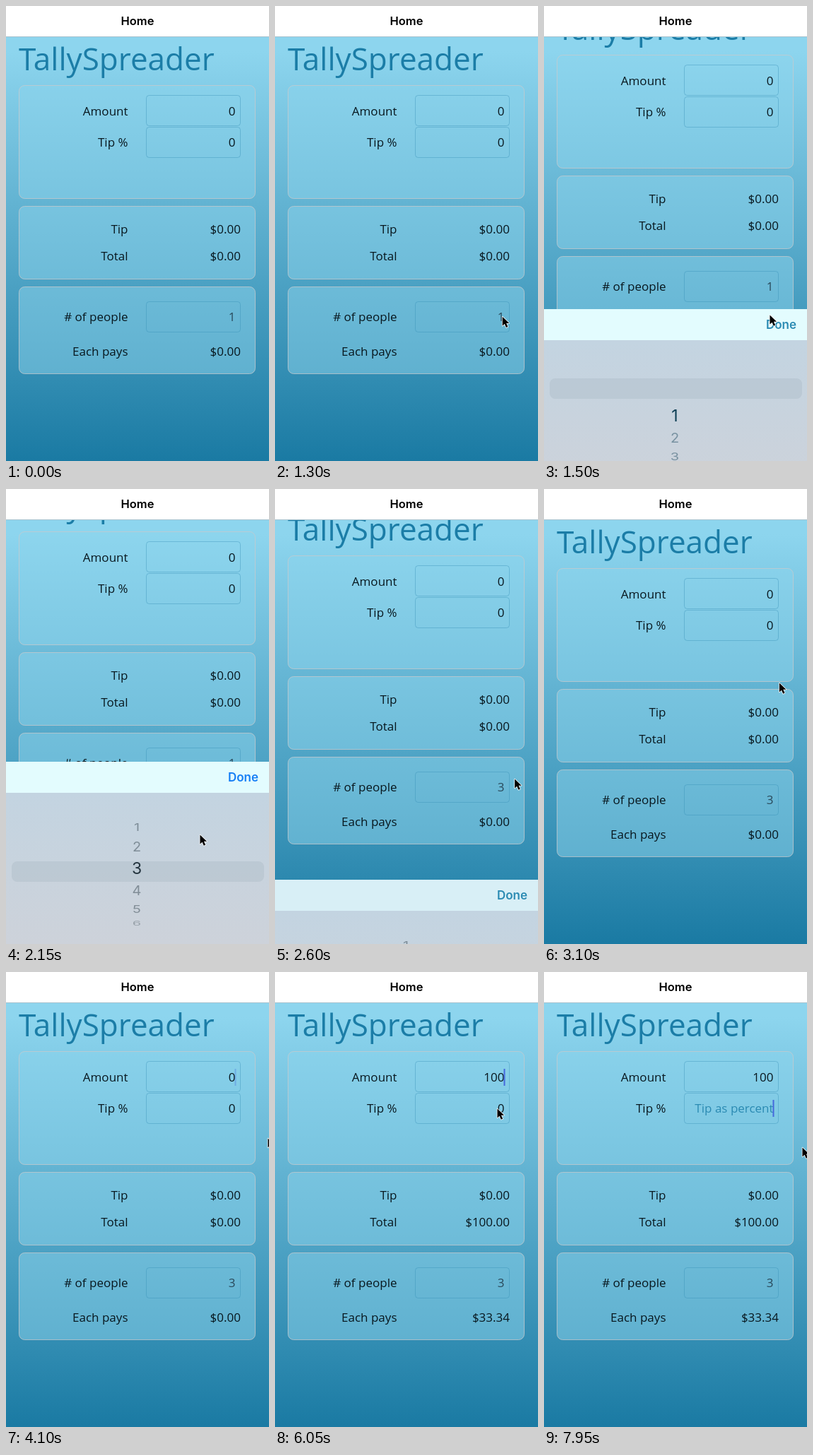
Animation of 372x644 px, one loop 8000 ms. Source, as an HTML page with a canvas:

```html
<!DOCTYPE html>
<html lang="en">
<head>
<meta charset="utf-8">
<title>Home</title>
<style>
  html, body { margin: 0; width: 100%; height: 100%; overflow: hidden; background: #fff; }
  canvas { display: block; width: 372px; height: 644px; }
</style>
</head>
<body>
<canvas id="stage" width="372" height="644"></canvas>
<script>
const ctx = document.getElementById('stage').getContext('2d');
const W = 372, H = 644, LOOP = 8000;
const BODY = '17px "Open Sans", "Noto Sans", sans-serif';
const SYSTEM = 'Inter, "Liberation Sans", sans-serif';
const INK = '#08171e', TEAL = '#1b7da7';
const PICKER_HEIGHT = 258, SCROLL = 52;

// Pointer path: time, x, y
const pointer = [
  [200, 343, 472], [600, 343, 475], [800, 342, 475], [950, 325, 442], [1200, 322, 440],
  [1500, 319, 437], [1650, 300, 465], [2000, 274, 489], [2150, 274, 489], [2400, 328, 406],
  [2500, 330, 406], [2700, 347, 414], [2900, 347, 400], [3300, 318, 150], [3650, 318, 150],
  [3850, 335, 180], [3950, 362, 225], [4100, 370, 235], [4900, 370, 235], [5200, 384, 240],
  [5800, 376, 238], [6000, 314, 193], [6180, 314, 193], [6350, 365, 248], [LOOP, 365, 248]
];

const clamp = v => Math.max(0, Math.min(1, v));
const smooth = v => (v = clamp(v), v * v * (3 - 2 * v));
const ramp = (t, from, to) => clamp((t - from) / (to - from));
const money = v => '$' + v.toFixed(2);

// Critically damped spring from 0 to 1
function spring(t, start) {
  const x = Math.max(0, t - start) * 0.0183;
  return 1 - (1 + x) * Math.exp(-x);
}

function text(str, x, y, align = 'right', color = INK, font = BODY) {
  ctx.font = font;
  ctx.textAlign = align;
  ctx.fillStyle = color;
  ctx.fillText(str, x, y);
}

function box(x, y, w, h, r, fill, stroke) {
  ctx.beginPath();
  ctx.roundRect(x, y, w, h, r);
  if (fill) { ctx.fillStyle = fill; ctx.fill(); }
  if (stroke) { ctx.strokeStyle = stroke; ctx.lineWidth = 1; ctx.stroke(); }
}

function state(t) {
  const typed = t < 4200 ? '0' : t < 4400 ? '1' : t < 4600 ? '10' : '100';
  const people = t < 2480 ? 1 : 3;
  const total = +typed;
  return { typed, people, total, share: Math.ceil(total * 100 / people) / 100 };
}

function caretAlpha(t) {
  const p = t % 1000;
  const blink = p < 750 ? 1 - ramp(p, 530, 670) : ramp(p, 840, 940);
  return blink * ramp(t, 4050, 4200);
}

function drawPage(t, shown) {
  const s = state(t);
  const sky = ctx.createLinearGradient(0, 64, 0, H);
  sky.addColorStop(0, '#8dd5ee');
  sky.addColorStop(1, '#1a7aa3');
  ctx.fillStyle = sky;
  ctx.fillRect(0, 43, W, H);

  ctx.save();
  ctx.translate(0, -Math.round(SCROLL * shown));
  text('TallySpreader', 18, 91, 'left', TEAL, '44px "Open Sans", "Noto Sans", sans-serif');

  for (const [y, h] of [[112.5, 160], [283.5, 103], [397.5, 123]])
    box(18.5, y, 334, h, 8, 'rgba(141,213,238,.5)', 'rgba(200,202,205,.75)');
  for (const y of [126.5, 171.5, 418.5])
    box(198.5, y, 133, 43, 4, null, 'rgba(50,140,178,.38)');

  const labels = [['Amount', 155], ['Tip %', 199], ['Tip', 322], ['Total', 360],
                  ['# of people', 446], ['Each pays', 495]];
  for (const [label, y] of labels) text(label, 172.5, y);

  text(s.typed, 324.5, 155);
  if (t < 7250) text('0', 324.5, 199);
  else text('Tip as percent', 324.5, 199, 'right', '#2a8ab2');
  text(s.people, 324.5, 446, 'right', '#29495a');
  text(money(0), 332, 322);
  text(money(s.total), 332, 360);
  text(money(s.share), 332, 495);

  ctx.globalAlpha = caretAlpha(t);
  ctx.fillStyle = '#4569dc';
  ctx.fillRect(323.5, t < 6150 ? 137 : 181, 2, 24);
  ctx.restore();
}

function drawPicker(t, shown) {
  const top = Math.round(H - PICKER_HEIGHT * shown);
  if (top >= H) return;
  ctx.save();
  ctx.beginPath();
  ctx.rect(0, top, W, H);
  ctx.clip();

  const body = ctx.createLinearGradient(0, top + 44, 0, top + PICKER_HEIGHT);
  body.addColorStop(0, '#c3d4e1');
  body.addColorStop(1, '#cdd2da');
  ctx.fillStyle = body;
  ctx.fillRect(0, top, W, H);
  if (top < 480) box(8, 527, 357, 29, 8, 'rgba(60,80,95,.08)');
  ctx.fillStyle = t > 2480 ? '#d8eff6' : '#e3fcfe';
  ctx.fillRect(0, top, W, 44);
  const dimmed = t < 1750 || t > 2480;
  text('Done', 357, top + 28, 'right', dimmed ? '#2b8bb3' : '#167ff5', '600 17px ' + SYSTEM);

  // Numbers sit on a turning cylinder
  const position = 1 + 2 * smooth(ramp(t, 1650, 2050));
  ctx.textBaseline = 'middle';
  for (let n = 1; n <= 7; n++) {
    const angle = (n - position) * 0.361;
    if (Math.abs(angle) > 1.3) continue;
    const focus = clamp(1 - Math.abs(n - position) * 2);
    ctx.save();
    ctx.translate(185, top + 151 + 87.6 * Math.sin(angle));
    ctx.scale(1, Math.cos(angle));
    ctx.globalAlpha = 0.42 * Math.min(1, Math.cos(angle) * 1.5) + 0.54 * focus;
    text(n, 0, 1, 'center', t < 1650 ? '#06384f' : '#1d2e38', (20 + 3 * focus) + 'px ' + SYSTEM);
    ctx.restore();
  }
  ctx.restore();
}

function drawPointer(t) {
  if (t < pointer[0][0]) return;
  const i = pointer.findIndex(k => k[0] > t);
  const [t0, x0, y0] = pointer[i - 1], [t1, x1, y1] = pointer[i];
  const k = smooth(ramp(t, t0, t1));
  ctx.save();
  ctx.translate(x0 + (x1 - x0) * k, y0 + (y1 - y0) * k);
  ctx.scale(0.93, 0.93);
  const arrow = new Path2D('M.5 .5V14.5L3.8 11.5L6.2 17L8.8 15.9L6.4 10.5H10.8Z');
  ctx.lineJoin = 'round';
  ctx.lineWidth = 1.6;
  ctx.strokeStyle = '#fff';
  ctx.stroke(arrow);
  ctx.fillStyle = '#000';
  ctx.fill(arrow);
  ctx.restore();
}

function drawHeader() {
  ctx.fillStyle = '#fff';
  ctx.fillRect(0, 0, W, 43);
  ctx.fillStyle = '#a9c3ce';
  ctx.fillRect(0, 43, W, 1);
  text('Home', 186, 27, 'center', '#000', '600 16.5px ' + SYSTEM);
}

function draw(now) {
  const t = now % LOOP;
  const shown = spring(t, 1325) - spring(t, 2480);
  drawPage(t, shown);
  drawPicker(t, shown);
  drawHeader();
  drawPointer(t);
  requestAnimationFrame(draw);
}
requestAnimationFrame(draw);
</script>
</body>
</html>
```
